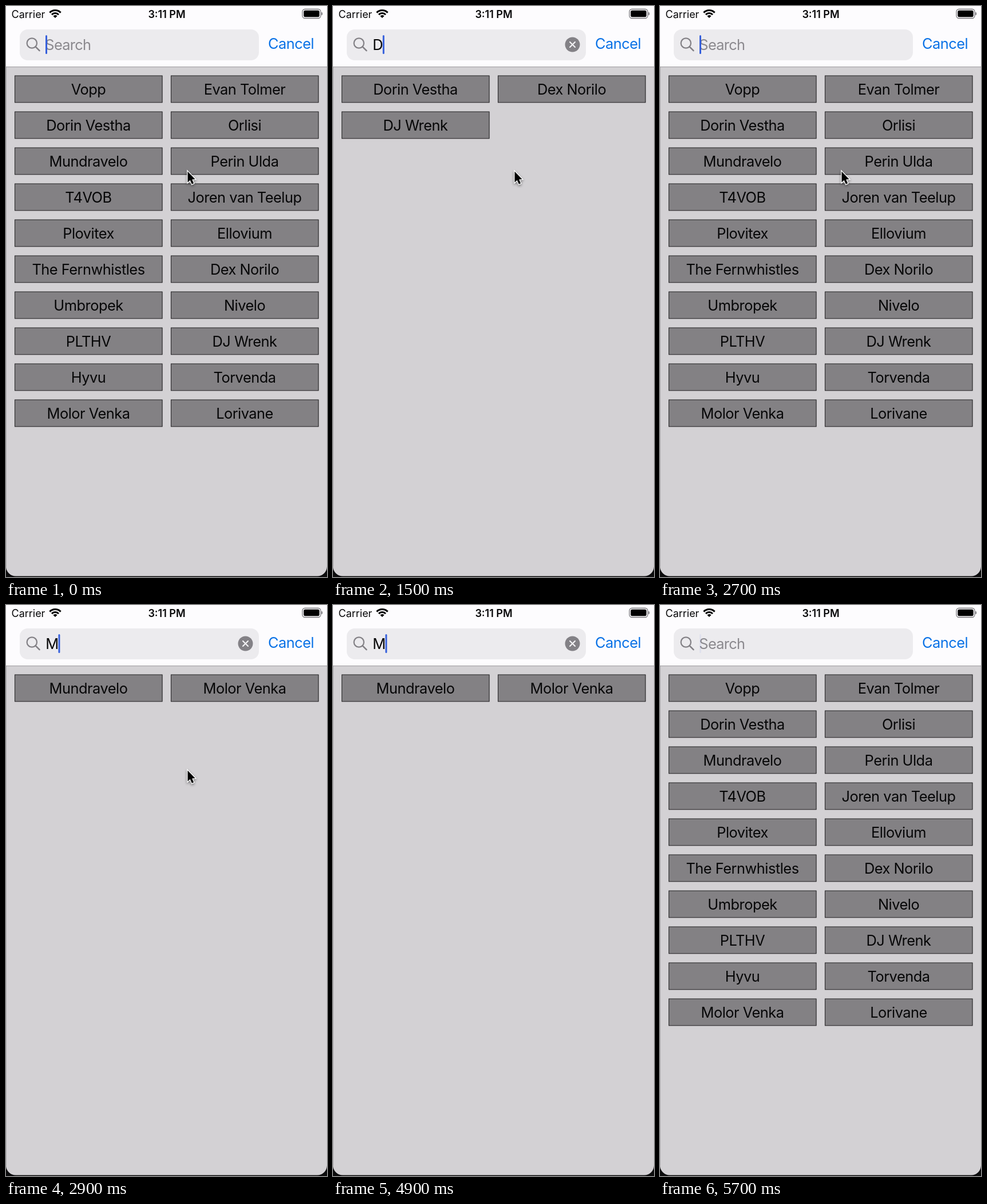
Write an HTML page with a canvas that moves like this. It is 561x999 px and loops after 5800 ms.

```html
<!DOCTYPE html>
<html lang="en">
<head>
<meta charset="utf-8">
<title>Search list</title>
<style>
  html, body { margin: 0; width: 100%; height: 100%; overflow: hidden; background: #000; }
  canvas { display: block; width: 561px; height: 999px; }
</style>
</head>
<body>
<canvas id="stage" width="561" height="999"></canvas>
<script>
const ctx = document.getElementById('stage').getContext('2d');
const LOOP = 5800, STEP = 100;
const GREY = '#838186', INK = '#060607';

const artists = [
  'Vopp', 'Evan Tolmer', 'Dorin Vestha', 'Orlisi', 'Mundravelo',
  'Perin Ulda', 'T4VOB', 'Joren van Teelup', 'Plovitex', 'Ellovium',
  'The Fernwhistles', 'Dex Norilo', 'Umbropek', 'Nivelo', 'PLTHV',
  'DJ Wrenk', 'Hyvu', 'Torvenda', 'Molor Venka', 'Lorivane'
];

const edits = [
  { at: 0, query: '' },
  { at: 100, query: 'D' },
  { at: 1600, query: '' },
  { at: 2900, query: 'M' },
  { at: 3800, query: 'MA' },
  { at: 4700, query: 'M' },
  { at: 5000, query: '' }
];
const POINTER_HIDDEN_AT = 4700;

function text(str, x, y, { size = 25.4, weight = 400, color = INK, align = 'left', spacing = -0.5 } = {}) {
  ctx.font = `${weight} ${size}px Inter, sans-serif`;
  ctx.letterSpacing = spacing + 'px';
  ctx.textAlign = align;
  ctx.fillStyle = color;
  ctx.fillText(str, x, y);
  return ctx.measureText(str).width;
}

function rounded(x, y, w, h, r, color) {
  ctx.beginPath();
  ctx.roundRect(x, y, w, h, r);
  ctx.fillStyle = color;
  ctx.fill();
}

function line(points, color, width) {
  ctx.beginPath();
  points.forEach(([x, y]) => ctx.lineTo(x, y));
  ctx.strokeStyle = color;
  ctx.lineWidth = width;
  ctx.stroke();
}

function wifi(x, y) {
  const spread = 0.8, up = -Math.PI / 2;
  ctx.strokeStyle = ctx.fillStyle = '#000';
  ctx.lineWidth = 3;
  for (const r of [8.4, 13.4]) {
    ctx.beginPath();
    ctx.arc(x, y, r, up - spread, up + spread);
    ctx.stroke();
  }
  ctx.beginPath();
  ctx.moveTo(x, y);
  ctx.arc(x, y, 5, up - spread, up + spread);
  ctx.fill();
}

function statusBar() {
  text('Carrier', 9.5, 20.5, { size: 18, spacing: 0 });
  wifi(86, 21);
  text('3:11 PM', 281, 20.5, { size: 18, weight: 600, align: 'center', spacing: 0 });
  ctx.beginPath();
  ctx.roundRect(518, 5.5, 32, 16, 4.5);
  ctx.strokeStyle = '#77767a';
  ctx.lineWidth = 1.3;
  ctx.stroke();
  rounded(520.3, 7.7, 27.4, 11.6, 2.5, '#000');
  rounded(551.3, 10.8, 1.8, 5.4, [0, 2, 2, 0], '#77767a');
}

// Solid for half a second after an edit, then a short fade out and in.
function caretOpacity(sinceEdit) {
  const phase = Math.max(0, sinceEdit - 60) % 1000;
  if (phase < 500) return 1;
  if (phase < 650) return (650 - phase) / 150;
  if (phase < 850) return 0;
  return (phase - 850) / 150;
}

function searchBar(query, sinceEdit) {
  rounded(24, 41, 418, 54, 14, '#ecebee');
  ctx.beginPath();
  ctx.arc(45.3, 65, 8.7, 0, 2 * Math.PI);
  ctx.strokeStyle = GREY;
  ctx.lineWidth = 2.2;
  ctx.stroke();
  ctx.lineCap = 'round';
  line([[51.7, 71.4], [58.5, 78.2]], GREY, 2.6);

  let width = 0;
  if (query) {
    width = text(query, 69.3, 76.7);
    ctx.beginPath();
    ctx.arc(418.5, 67.5, 13, 0, 2 * Math.PI);
    ctx.fillStyle = GREY;
    ctx.fill();
    line([[414, 63], [423, 72]], '#f4f3f6', 2.1);
    line([[423, 63], [414, 72]], '#f4f3f6', 2.1);
  } else {
    text('Search', 68.3, 76.7, { color: '#8b898e', spacing: -0.7 });
  }
  ctx.lineCap = 'butt';

  ctx.globalAlpha = caretOpacity(sinceEdit);
  rounded(69 + width, 51, 3, 33, 1.5, '#3660dc');
  ctx.globalAlpha = 1;
  text('Cancel', 458, 75.3, { color: '#0a72e6' });
}

function results(query) {
  artists.filter(name => name.startsWith(query)).forEach((name, i) => {
    const x = i % 2 ? 288.5 : 15.5;
    const y = 122 + 63 * Math.floor(i / 2);
    ctx.fillStyle = '#838184';
    ctx.fillRect(x, y, 258, 47);
    ctx.strokeStyle = '#2b2a2c';
    ctx.lineWidth = 1.1;
    ctx.strokeRect(x, y, 257.5, 46.8);
    text(name, x + 128.5, y + 32.8, { align: 'center' });
  });
}

function pointer(x, y) {
  const outline = [[0, 0], [0, 19], [4.3, 15.2], [7.4, 22.2], [10.6, 20.8], [7.6, 13.9], [13, 13.4]];
  ctx.save();
  ctx.translate(x, y);
  ctx.beginPath();
  outline.forEach(([px, py]) => ctx.lineTo(px, py));
  ctx.closePath();
  ctx.shadowColor = 'rgba(0,0,0,.45)';
  ctx.shadowBlur = 4;
  ctx.shadowOffsetY = 2;
  ctx.strokeStyle = '#fff';
  ctx.lineWidth = 2.6;
  ctx.stroke();
  ctx.shadowColor = 'transparent';
  ctx.fillStyle = '#000';
  ctx.fill();
  ctx.restore();
}

function draw(time) {
  const edit = edits.findLast(e => e.at <= time);
  ctx.fillStyle = '#0c0c0d';
  ctx.fillRect(0, 0, 561, 999);
  rounded(0, -20, 561, 1017.5, 17, '#d3d1d4');
  ctx.fillStyle = '#fdfcfe';
  ctx.fillRect(0, 0, 561, 106);
  ctx.fillStyle = '#9c9a9d';
  ctx.fillRect(0, 106, 561, 1);
  ctx.fillStyle = '#b3b1b4';
  ctx.fillRect(0, 107, 1, 874);
  statusBar();
  searchBar(edit.query, time - edit.at);
  results(edit.query);
  if (time < POINTER_HIDDEN_AT) pointer(317.5, 289.5);
}

const start = performance.now();
function tick() {
  const elapsed = (performance.now() - start) % LOOP;
  draw(Math.floor(elapsed / STEP) * STEP);
  requestAnimationFrame(tick);
}
tick();
</script>
</body>
</html>
```
